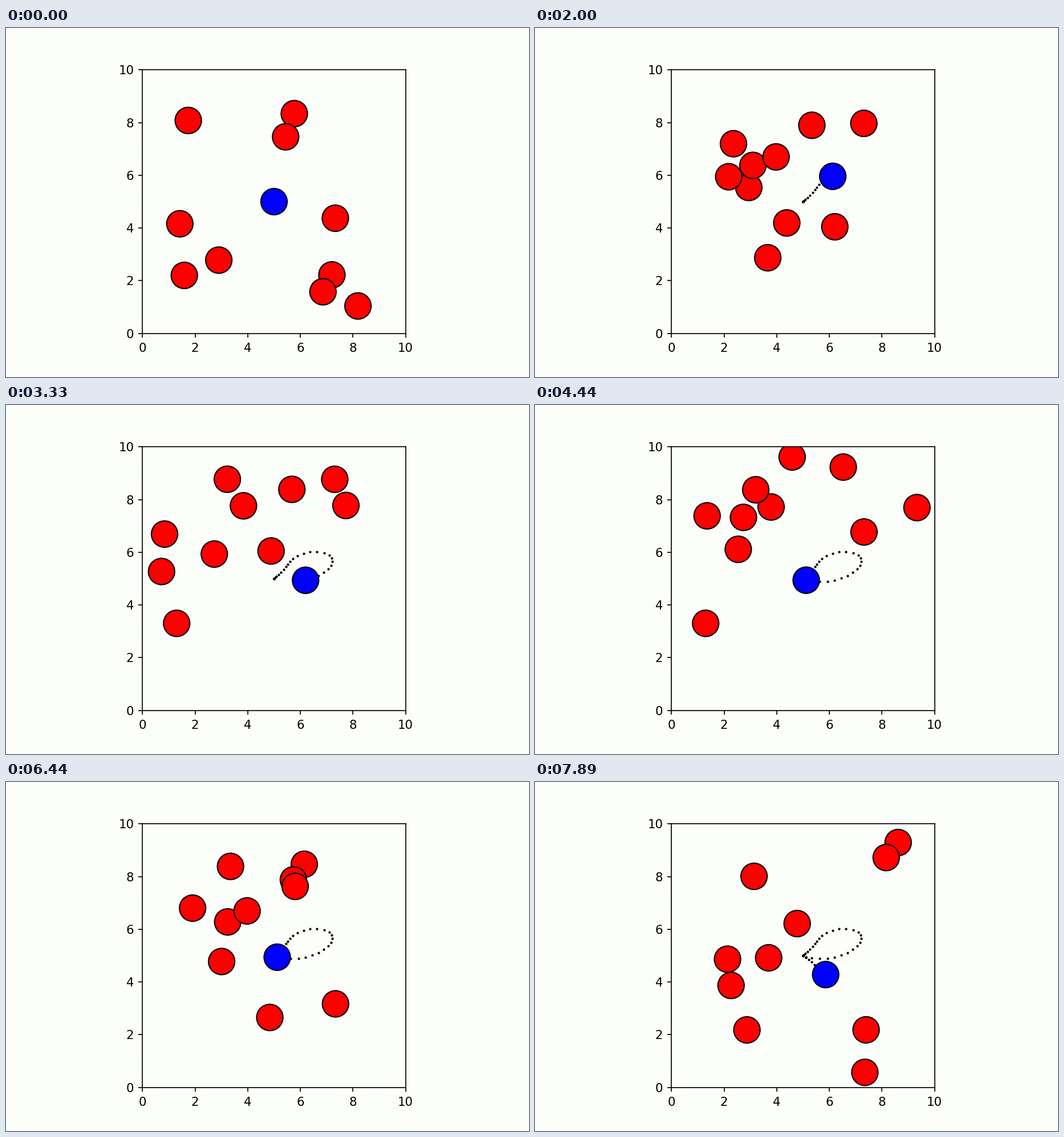
Write a matplotlib script that moves like this. It is 917 by 611 pixels and loops after 8000 ms.

```python
import numpy as np
import matplotlib.pyplot as plt
from matplotlib.animation import FuncAnimation
from matplotlib.patches import Circle

W, H, DPI = 917, 611, 152.75
LOOP_MS, TICK_MS = 8000, 20
STEPS = 72                      # simulation steps in one loop
SIZE, RADIUS, SPEED = 10, 0.5, 0.2
PAPER = "#fcfefa"

# Obstacles, back to front: start x, start y, heading in degrees
OBSTACLES = [
    (1.59, 2.20, 68.0), (8.19, 1.04, 123.4), (2.90, 2.78, 86.9),
    (1.42, 4.16, 44.8), (7.20, 2.22, 169.6), (6.86, 1.58, 133.5),
    (5.77, 8.34, 198.5), (1.74, 8.08, -2.9), (5.44, 7.46, 204.9),
    (7.33, 4.37, 90.3),
]

# The robot waits, drives a loop through these points, waits, drives off
WAYPOINTS = np.array([
    (5.00, 5.00), (5.17, 5.15), (5.46, 5.45), (5.71, 5.75), (6.37, 6.02),
    (7.10, 5.89), (7.16, 5.50), (6.69, 5.11), (5.93, 4.89), (5.12, 4.94),
])
EXIT = (5.86, 4.28)
LOOP_START, EXIT_START, STEPS_PER_LEG = 7, 64, 3


def spline(points, n):
    """Catmull-Rom curve with n steps between neighbouring points."""
    p = np.vstack([points[0], points, points[-1]])
    curve = []
    for a, b, c, d in zip(p, p[1:], p[2:], p[3:]):
        for u in np.arange(n) / n:
            curve.append(b + u / 2 * (c - a + u * (2*a - 5*b + 4*c - d
                                                   + u * (3*b - a - 3*c + d))))
    return np.array(curve + [points[-1]])


def robot_path():
    loop = spline(WAYPOINTS, STEPS_PER_LEG)
    wait = np.tile(loop[0], (LOOP_START, 1))
    rest = np.tile(loop[-1], (EXIT_START - LOOP_START - len(loop), 1))
    leave = np.linspace(loop[-1], EXIT, STEPS - EXIT_START)
    return np.vstack([wait, loop, rest, leave])


def obstacle_path(x, y, heading):
    """Straight run that turns back on itself at the walls."""
    pos = np.array([x, y])
    a = np.radians(heading)
    step = SPEED * np.array([np.cos(a), np.sin(a)])
    path = [pos]
    for _ in range(STEPS - 1):
        pos = pos + step
        path.append(pos)
        if pos.min() < RADIUS or pos.max() > SIZE - RADIUS:
            step = -step
    return path


def add_disc(center, color):
    return ax.add_patch(Circle(center, RADIUS, fc=color, ec="black", lw=1))


plt.rcParams.update({"font.family": "DejaVu Sans", "font.size": 10})
fig = plt.figure(figsize=(W / DPI, H / DPI), dpi=DPI, facecolor=PAPER)
ax = fig.add_axes([0.125, 0.125, 0.775, 0.755], facecolor=PAPER)
ax.set(xlim=(0, SIZE), ylim=(0, SIZE), aspect="equal",
       xticks=range(0, SIZE + 1, 2), yticks=range(0, SIZE + 1, 2))
ax.tick_params(axis="x", pad=4)

route = robot_path()
paths = [obstacle_path(*o) for o in OBSTACLES]
trail, = ax.plot([], [], "o", color="black", ms=2, mew=0, zorder=0.9)
discs = [add_disc(p[0], "#fe0000") for p in paths]
robot = add_disc(route[0], "#0000fe")


def draw(i):
    step = min((i + 1) * TICK_MS * STEPS // LOOP_MS, STEPS - 1)
    for disc, path in zip(discs, paths):
        disc.center = path[step]
    robot.center = route[step]
    trail.set_data(*route[:step + 1].T)
    return [trail, *discs, robot]


anim = FuncAnimation(fig, draw, frames=LOOP_MS // TICK_MS, interval=TICK_MS,
                     repeat=True, repeat_delay=0)
plt.show()
```
